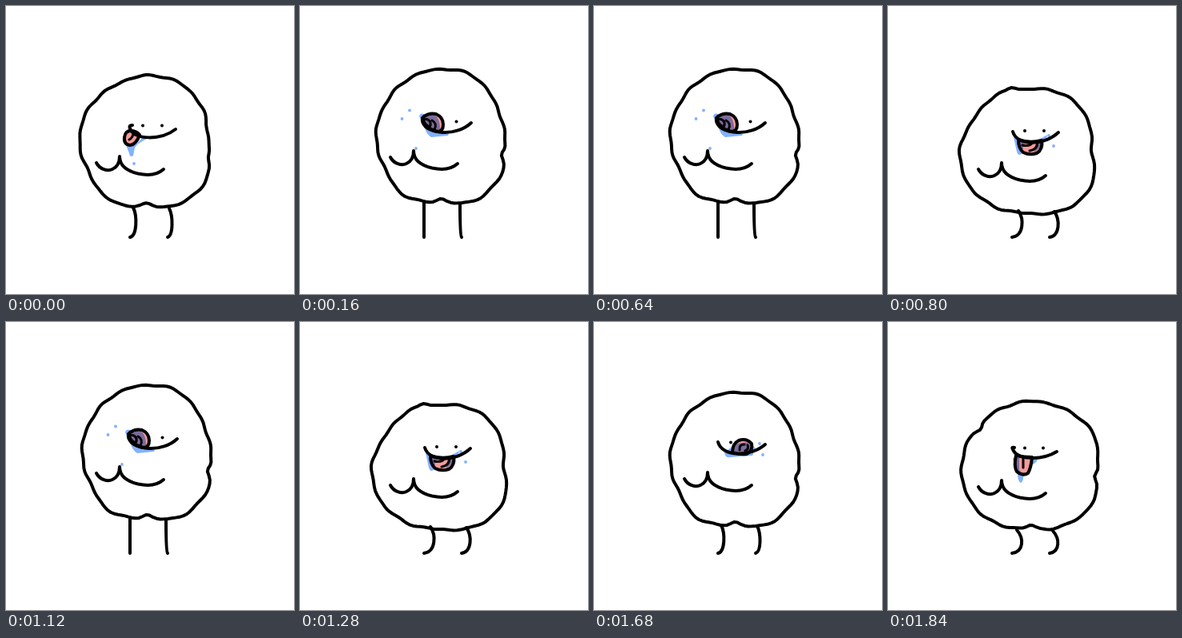
An HTML page for the animation above (1920 ms loop, 360 by 360 pixels).

```html
<!DOCTYPE html>
<html lang="en">
<head>
<meta charset="utf-8">
<title>Licking blob</title>
<style>
  html, body { margin: 0; width: 100%; height: 100%; overflow: hidden; background: #fff; }
  svg { display: block; width: 100vw; height: 100vh; }
  path { fill: none; stroke: #000; stroke-width: 4; stroke-linecap: round; stroke-linejoin: round; }
  .tongue { fill: #f49b9b; }
  .crease { stroke-width: 3; }
  .drool { fill: #82b1ff; stroke: none; mix-blend-mode: multiply; }
  .pose { visibility: hidden; animation: show 480ms step-end infinite; }
  @keyframes show {
    0% { visibility: visible; }
    16.6667%, 100% { visibility: hidden; }
  }
</style>
</head>
<body>
<svg id="stage" viewBox="0 0 360 360"></svg>
<script>
const STEP = 80, COUNT = 6;

// Cubic interpolation through evenly spaced radii, wrapping around
function radiusAt(radii, deg) {
  const n = radii.length, pos = deg / 360 * n, i = Math.floor(pos), t = pos - i;
  const [a, b, c, d] = [-1, 0, 1, 2].map(k => radii[(i + k + n) % n]);
  return b + t / 2 * (c - a + t * (2 * a - 5 * b + 4 * c - d + t * (3 * (b - c) + d - a)));
}

// Wobbly outline: key radii clockwise from the top, plus narrow dents [angle, depth]
function blob(cx, cy, radii, dents, seed) {
  const pts = [];
  for (let deg = 0; deg < 360; deg += 3) {
    const rad = deg * Math.PI / 180;
    let r = radiusAt(radii, deg) + 0.6 * Math.sin(17 * rad + seed) + 0.5 * Math.sin(11 * rad + 2 * seed);
    for (const [at, depth] of dents) r -= depth * Math.exp(-(((deg - at) / 5) ** 2));
    pts.push((cx + r * Math.sin(rad)).toFixed(1) + ' ' + (cy - r * Math.cos(rad)).toFixed(1));
  }
  return 'M' + pts.join('L') + 'Z';
}

const round = y => blob(175, y, [81, 83, 81, 78, 89, 90, 82, 87, 82, 83, 82, 79], [[106, 3], [179, 3]], 1);
const tall = y => blob(175, y, [83, 85, 80, 81, 90, 92, 83, 87, 80, 80, 79, 81], [[107, 6], [179, 4]], 2);
const flat = y => blob(175, y, [76, 82, 84, 80, 91, 87, 79, 82, 86, 85, 78, 79], [[345, -4]], 3);
const wide = y => blob(177, y, [81, 83, 89, 86, 91, 86, 78, 83, 86, 85, 82, 80], [[99, 6], [179, 4], [307, 5]], 4);

const path = (d, cls = '') => `<path d="${d}" class="${cls}"/>`;
const dot = (x, y, r = 2, cls = '') => `<circle cx="${x}" cy="${y}" r="${r}" class="${cls}"/>`;
const drop = (x, y) => dot(x, y, 1.9, 'drool');
const tongue = (shape, crease) => path(shape, 'tongue') + path(crease, 'crease');
const drool = d => path(d, 'drool');
const smile = (x, y, endX, endY, sag) => path(`M${x} ${y}C${x + 5} ${sag} ${endX - 18} ${sag} ${endX} ${endY}`);

// Knees bend more as the body sinks
const leg = (x, top, bow, foot) =>
  path(`M${x} ${top}C${x + bow} ${top + 10} ${x + bow} 287 ${foot} 289`);
const legs = (x, top, bow) => leg(x, top, bow, 155) + leg(x + 45, top + 1, bow, 202);

const arms = y => path(`M113 ${y}c4 8 14 11 20 8q9-4 9-16q0 16 23 21.500q21 4.500 32-5.500`);

const poses = [
  legs(159, 252, 5) + path(round(168)) + arms(196) +
    tongue('M167 161Q163 173 155 174Q147 173 148 164Q149 156 156 156Q163 156 167 161Z', 'M159 160Q158 165 154 167') +
    drool('M150 174L163 173L171 164L176 166Q164 172 161 177L159 187Q155 190 154 184Z') + drop(160, 197) +
    path('M158 149Q153 149 155 153') + smile(155, 153, 212, 154, 168) +
    dot(171, 149.5) + dot(195, 149.5),

  legs(157, 247, 3) + path(round(162)) + arms(192) +
    tongue('M166 158Q157 166 150 162Q144 156 148 149Q154 144 161 149Q167 152 166 158Z', 'M159 152Q154 152 153 157') +
    drool('M146 156Q150 171 161 168L174 162L157 153Z') + drop(147, 176) + drop(139, 151) +
    smile(154, 147, 213, 150, 166) + dot(171, 147) + dot(195, 147),

  legs(155, 246, 0) + path(tall(162)) + arms(189) +
    tongue('M157 151Q150 143 155 138Q162 133 170 135Q179 139 179 148Q179 157 172 157Q163 156 157 151Z',
      'M154 142Q161 140 163 146Q164 150 161 151L156 147M165 143Q172 147 168 154') +
    drool('M149 138Q150 133 155 135L168 136Q176 141 175 158L186 160L185 162L164 164Q158 160 156 153Z') +
    drop(137, 130.5) + drop(127.5, 141) + drop(145, 178) +
    smile(153, 140, 214, 146, 163) + dot(195.5, 144.5),

  legs(159, 254, 5) + path(tall(171)) + arms(196) +
    tongue('M173 163Q173 152 181 148Q191 145 197 152Q199 161 191 165Q181 166 173 163Z',
      'M182 160Q181 153 188 153M189 161Q194 159 192 154') +
    drool('M163 163Q164 170 169 169L198 167L202 158L194 150L178 152Z') + drop(207, 152) + drop(211, 166) +
    smile(155, 150, 214, 153, 169) + dot(171, 150.5),

  legs(163, 256, 7) + path(flat(180)) + arms(204) +
    tongue('M163 167Q163 178 169 183Q177 187 186 184Q194 179 192 168Q177 172 163 167Z',
      'M168 174Q178 176 181 170M177 181Q186 180 187 171') +
    drool('M157 164L170 169L168 184Q163 189 161 182ZM185 169L199 161Q198 168 192 175L183 183Z') +
    drop(201, 162) + drop(209, 161) + drop(207, 175) +
    smile(156, 157, 213, 158, 175) + dot(171, 156) + dot(195, 156),

  legs(161, 260, 9) + path(wide(180)) + arms(206) +
    tongue('M160 167Q157 180 161 187Q168 193 175 189Q179 182 180 169Q170 169 160 167Z', 'M169 171V182') +
    drool('M156 170L164 170L164 185L169 190Q170 199 166 201Q162 199 162 190ZM179 171L188 169Q187 176 179 179Z') +
    path('M158 157Q154 156 156 159') + smile(156, 159, 211, 162, 173) +
    dot(171, 157.5) + dot(194, 157.5)
];

document.getElementById('stage').innerHTML = poses.map((art, i) =>
  `<g class="pose" style="animation-delay:${(i - COUNT) * STEP}ms">${art}</g>`).join('');
</script>
</body>
</html>
```
